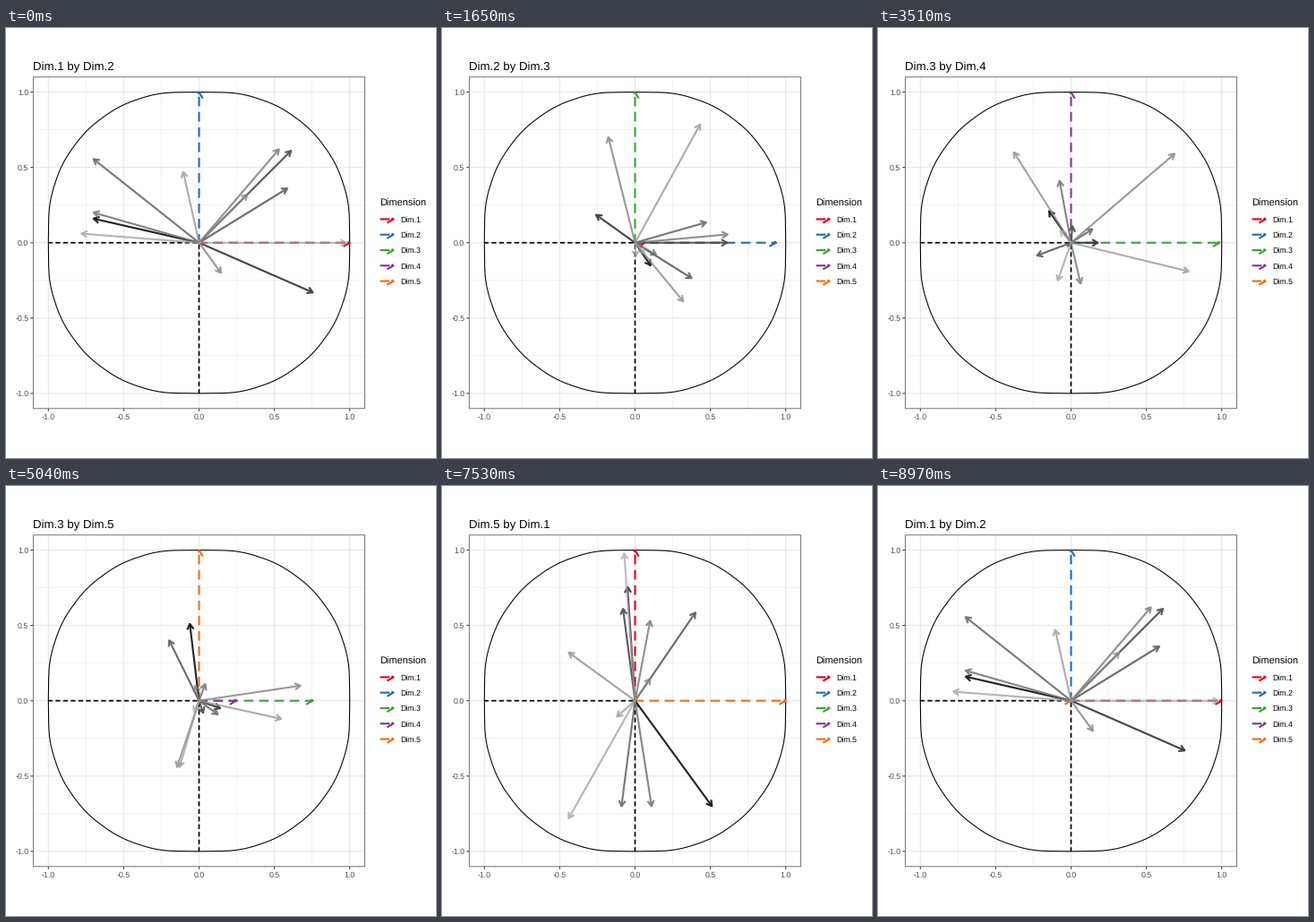
Write a matplotlib script that moves like this. It is 480 px wide and 480 px high and loops after 9000 ms.

```python
import numpy as np
import matplotlib.pyplot as plt
from matplotlib.animation import FuncAnimation

plt.rcParams["font.family"] = "Liberation Sans"
plt.rcParams["text.hinting"] = "none"

SIZE, DPI = 480, 72            # at 72 dpi one point is one pixel
CX, CY, UNIT = 215.5, 239.7, 168.2
HALF = 1.1 * UNIT              # half side of the panel
STATES, STEP = 10, 30
HOLD, MOVE = 10.1, 20          # frames at rest, frames in motion
HEAD, SPREAD = 7.2, np.pi / 6
THIN, THICK = 1.07, 2.13

DIM_COLORS = ["#DE0420", "#246CB0", "#3CA338", "#84388F", "#F46E12"]


def variable_tips():
    """Each variable is a mix of the five axes; the last is their balance."""
    a, b, c, d, e = np.eye(5)
    sprint = -.70 * a
    tips = [
        sprint + .16 * b - .15 * c + .21 * d + .51 * e,
        .755 * a - .33 * b + .185 * c - .05 * e,
        .61 * (a + b) + .11 * d - .08 * e,
        .585 * a + .36 * b - .235 * c - .085 * d + .40 * e,
        sprint + .555 * b + .135 * c + .09 * (d - e),
        sprint + .20 * b - .08 * c + .41 * d + .11 * e,
        .53 * a + .62 * b + .055 * c - .27 * d + .10 * e,
        .145 * a - .20 * b + .70 * c + .59 * d + .10 * e,
        .32 * (a + b) - .39 * c + .60 * d - .44 * e,
        -.105 * a + .47 * b + .785 * c - .19 * d - .12 * e,
    ]
    total = sum(np.sign(t[0]) * t for t in tips)
    rank = -.78 * a + .06 * b - .09 * c - .25 * d - .44 * e
    return np.array(tips + [rank, .985 * total / np.linalg.norm(total)])


def plane(k):
    """Horizontal and vertical dimension; they step forward in turn."""
    k %= STATES
    return k // 2, ((k + 1) // 2 + 1) % 5


TIPS = variable_tips()

fig = plt.figure(figsize=(SIZE / DPI, SIZE / DPI), dpi=DPI, facecolor="white")
ax = fig.add_axes([0, 0, 1, 1])
ax.set_xlim(0, SIZE)
ax.set_ylim(SIZE, 0)
ax.axis("off")


def px(x, y):
    return CX + UNIT * np.asarray(x), CY - UNIT * np.asarray(y)


def line(x, y, color, lw, z, cap="butt", **kw):
    return ax.plot(x, y, color=color, lw=lw, zorder=z, snap=False,
                   solid_capstyle="butt", dash_capstyle=cap,
                   solid_joinstyle="round", dash_joinstyle="round", **kw)[0]


def label(x, y, s, size, color="black", ha="left"):
    return ax.text(x, y, s, fontsize=size, color=color, ha=ha, va="baseline")


def blend(num, den):
    p, u = 2 * den ** 2, num / den
    return u ** 3 * (10 - p + (2 * p - 15) * u + (6 - p) * u ** 2)


def xspline(pts, shape=0.5):
    """Open X-spline; the end points have shape 0."""
    n = len(pts)
    s = np.full(n, shape)
    s[[0, -1]] = 0
    t = np.linspace(0, 1, 9)[:, None]
    out = []
    for k in range(n - 1):
        a, b = s[k], s[k + 1]
        w = [np.where(t < a, blend(t - a, -1 - a), 0),
             blend(t - 1 - b, -1 - b),
             blend(t + a, 1 + a),
             np.where(t > 1 - b, blend(t - 1 + b, 1 + b), 0)]
        near = [pts[max(k - 1, 0)], pts[k], pts[k + 1], pts[min(k + 2, n - 1)]]
        out.append(sum(wi * q for wi, q in zip(w, near)) / sum(w))
    return np.vstack(out)


def rounded_outline(curvature=0.5, inner=5):
    """Four bulging quarter curves joining the unit points of the axes."""
    half = 2 * np.arctan(curvature)
    radius = np.sqrt(0.5) / np.sin(half)
    mid = np.sqrt(0.5) - radius * np.cos(half)
    th = np.pi / 4 + np.linspace(half, -half, inner + 2)
    arc = mid * np.sqrt(0.5) + radius * np.column_stack([np.cos(th), np.sin(th)])
    parts = [xspline(arc)]
    turn = np.array([[0, -1], [1, 0]])
    for _ in range(3):
        parts.append(parts[-1] @ turn)
    return np.vstack(parts)


def grid(values, lw):
    for v in values:
        x, y = px(v, v)
        line([x, x], [CY - HALF, CY + HALF], "#E7E7E7", lw, 1)
        line([CX - HALF, CX + HALF], [y, y], "#E7E7E7", lw, 1)


def draw_panel():
    left, right, top, bottom = CX - HALF, CX + HALF, CY - HALF, CY + HALF
    ticks = np.arange(-1, 1.1, 0.5)
    grid(ticks[:-1] + 0.25, THIN / 2)
    grid(ticks, THIN)
    for v in ticks:
        x, y = px(v, v)
        line([x, x], [bottom, bottom + 3], "#333333", THIN, 1)
        line([left - 3, left], [y, y], "#333333", THIN, 1)
        label(x, 437, f"{v:.1f}", 8.8, "#4D4D4D", "center")
        label(25.3, y + 3.2, f"{v:.1f}", 8.8, "#4D4D4D", "right")
    line([left, right, right, left, left], [top, top, bottom, bottom, top],
         "#7F7F7F", THIN, 2)
    line(*px(*rounded_outline().T), "black", THIN, 3)
    for x, y in ([-1, 0], [0, 0]), ([0, 0], [-1, 0]):
        line(*px(x, y), "black", 1.7, 3, ls=(0.3, (3.1, 1.9)))


def arrow_path(x0, y0, x1, y1):
    """Shaft and open head; empty for a zero-length arrow."""
    if np.hypot(x1 - x0, y1 - y0) < 1e-9:
        return [], []
    back = np.arctan2(y0 - y1, x0 - x1)
    a, b = back - SPREAD, back + SPREAD
    xs = [x0, x1, np.nan, x1 + HEAD * np.cos(a), x1, x1 + HEAD * np.cos(b)]
    ys = [y0, y1, np.nan, y1 + HEAD * np.sin(a), y1, y1 + HEAD * np.sin(b)]
    return xs, ys


def dim_arrow(i):
    return line([], [], DIM_COLORS[i], THICK, 5 + 0.01 * i, "projecting",
                ls=(0, (4, 4)))


def var_arrow(i, n):
    f = i / (n - 1)
    shade = (0.14 ** 2.2 * (1 - f) + 0.74 ** 2.2 * f) ** (1 / 2.2)
    alpha = 0.95 - 0.23 * f
    pigment = max(0, (shade - 1 + alpha) / alpha)
    return line([], [], (pigment,) * 3 + (alpha,), THICK, 6 + 0.01 * i)


def draw_legend():
    label(417, 198.4, "Dimension", 11)
    for i in range(5):
        y = 213.4 + 17.28 * i
        dim_arrow(i).set_data(*arrow_path(418.7, y, 432.5, y))
        label(439.8, y + 3.3, f"Dim.{i + 1}", 8.8)


def weights(dims):
    return np.eye(5)[:, list(dims)]


def cubic_in_out(p):
    return 4 * p ** 3 if p < 0.5 else 1 - 4 * (1 - p) ** 3


draw_panel()
draw_legend()
title = label(30, 47, "", 13.2)
dim_arrows = [dim_arrow(i) for i in range(5)]
var_arrows = [var_arrow(i, len(TIPS)) for i in range(len(TIPS))]


def update(frame):
    k, r = divmod(frame, STEP)
    start, end = plane(k), plane(k + 1)
    p = max(0, (r - HOLD) / MOVE)
    e = cubic_in_out(p)
    w = (1 - e) * weights(start) + e * weights(end)
    x, y = end if p > 0.5 else start
    title.set_text(f"Dim.{x + 1} by Dim.{y + 1}")
    for art, tip in zip(dim_arrows + var_arrows, np.vstack([w, TIPS @ w])):
        art.set_data(*arrow_path(CX, CY, *px(*tip)))
    return [title, *dim_arrows, *var_arrows]


anim = FuncAnimation(fig, update, frames=STATES * STEP, interval=30,
                     repeat=True, repeat_delay=0, blit=False)
plt.show()
```
